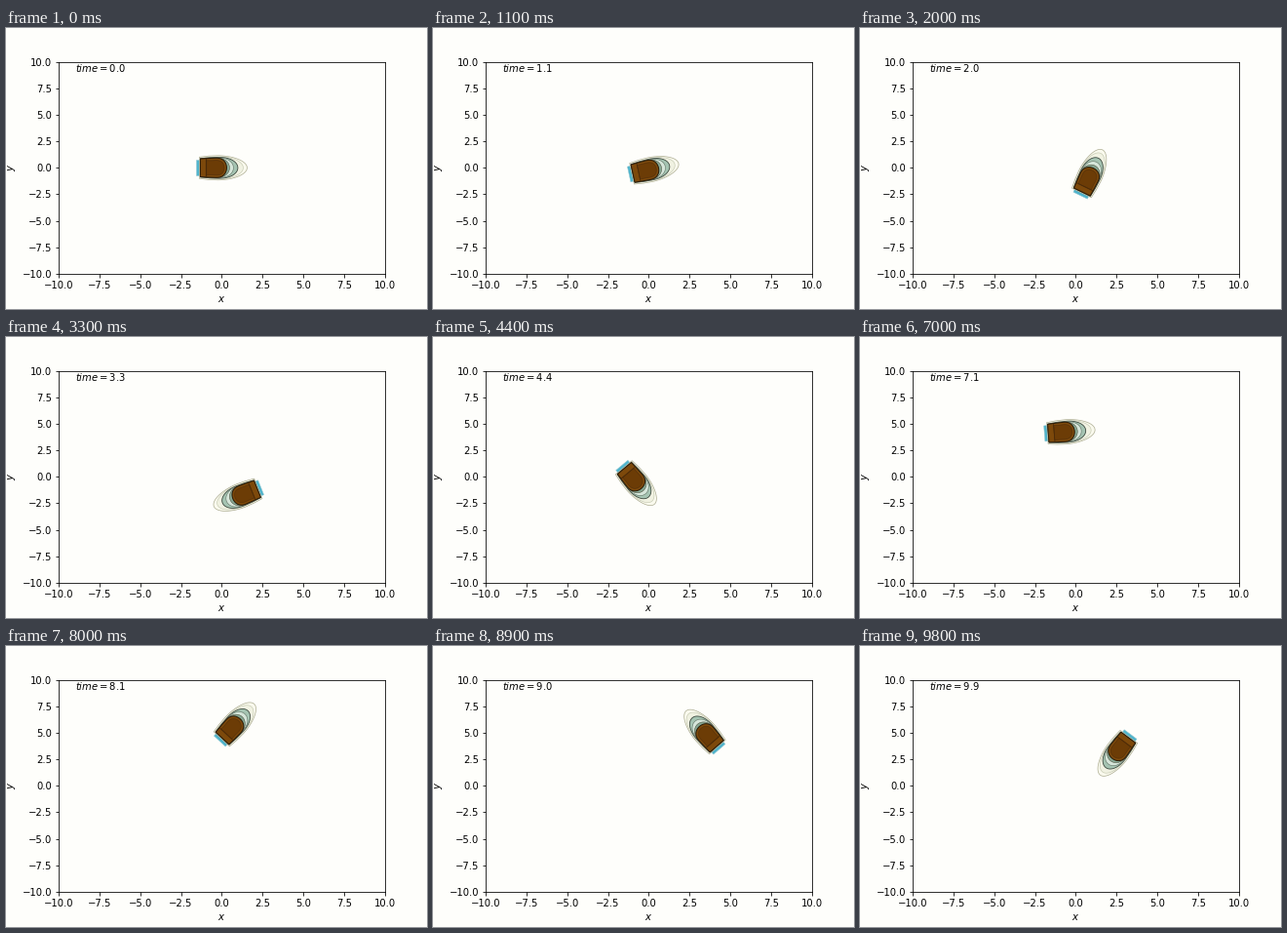
Write a matplotlib script that moves like this. It is 432x288 px and loops after 9.9 s.

```python
import numpy as np
import matplotlib.pyplot as plt
from matplotlib.animation import FuncAnimation
from matplotlib.patches import Polygon
from matplotlib.transforms import Affine2D

FRAMES, INTERVAL = 99, 100
W, H, DPI = 432, 288, 72
PAPER = "#fefefb"

plt.rcParams.update({"font.family": "DejaVu Sans", "font.size": 10,
                     "mathtext.fontset": "dejavusans"})


def heading(t):
    return t - np.sin(t)


def build_track():
    """Integrate the drift velocity, then pull the track onto its waypoints."""
    t = np.linspace(0, 10, 2001)
    surge = np.interp(t, [0, 1.3, 2.67, 3.8, 4.6, 5.4, 6.3, 7, 8.08, 9, 9.9],
                      [0, .72, 1.1, 1.55, 1.1, .45, .05, .2, .85, 1.2, 1.1])
    sway = np.interp(t, [0, 1.3, 2, 2.67, 3.9, 5.2, 6.3, 7, 8.08, 9, 9.9],
                     [0, .05, .4, .9, 1.5, 1.9, 1.95, 1.9, 2.4, 2.95, 3.1])
    vel = (surge + 1j * sway) * np.exp(-1j * heading(t))
    pos = np.concatenate([[0], np.cumsum((vel[1:] + vel[:-1]) / 2) * t[1]])
    marks = np.array([0, 20, 33, 44, 59, 80, 98]) * 10 / 99
    goals = np.array([0, .96 - .46j, .96 - 1.9j, -.65 - .75j,
                      -.56 + 2.19j, .93 + 5.96j, 2.43 + 2.93j])
    return t, pos + np.interp(t, marks, goals - np.interp(marks, t, pos))


def bow_shape(back, mid, front, half, power=2.2, stern=0.88):
    """Outline with a flat stern and a rounded bow, in pixels, bow to +x."""
    s = np.sin(np.linspace(0, np.pi / 2, 30))
    x = np.concatenate([[back, (back + mid) / 2], mid + (front - mid) * s])
    y = half * np.concatenate([[stern, 0.97], np.sqrt(1 - s ** power)])
    return np.column_stack([np.r_[x, x[::-1]], np.r_[y, -y[::-1]]])


def box(x0, x1, half):
    return np.array([(x0, -half), (x1, -half), (x1, half), (x0, half)])


fig = plt.figure(figsize=(W / DPI, H / DPI), dpi=DPI, facecolor=PAPER)
fig.subplots_adjust(left=0.125, right=0.9, bottom=0.125, top=0.88)
ax = fig.add_subplot(facecolor=PAPER)
ax.set(xlim=(-10, 10), ylim=(-10, 10), xlabel="$x$", ylabel="$y$",
       xticks=np.arange(-10, 10.1, 2.5), yticks=np.arange(-10, 10.1, 2.5))
clock = ax.text(-9, 9, "")

# outline, fill, edge, line width
LAYERS = [
    (box(-26, -22, 8), "#4fb4cc", "#8fc6d0", 0.5),
    (bow_shape(-23, -4, 26, 12.5, 1.9), "#fafaee", "#adad92", 0.7),
    (bow_shape(-22, -2, 22, 11.3, 2.0), "#f1f2e2", "#c4c8b0", 0.6),
    (bow_shape(-22, -3, 16.5, 10.8), "#a5c4b2", "#38443a", 0.8),
    (bow_shape(-22, -3, 12, 10.3), "#d6e6da", "#66786a", 0.6),
    (bow_shape(-22, -5, 8, 10.2), "#86a894", "#4a4a38", 0.5),
    (bow_shape(-22, -6, 5, 10, 2.6, 0.93), "#7d490b", "#2b1a06", 1.0),
    (bow_shape(-16, -6, 2.5, 7.6, 2.6, 0.98), "#6c3c06", "#55300a", 0.6),
    (box(-16.3, -15.7, 9.3), "#4a2a08", "#4a2a08", 0.2),
]
boat = [ax.add_patch(Polygon(pts, closed=True, fc=fill, ec=edge, lw=lw, zorder=2))
        for pts, fill, edge, lw in LAYERS]

track_t, track = build_track()
area = ax.get_position()


def update(i):
    t = i * 10 / 99
    p = np.interp(t, track_t, track)
    px = W * (area.x0 + area.width * (p.real + 10) / 20)
    py = H * (area.y0 + area.height * (p.imag + 10) / 20)
    place = Affine2D().rotate(heading(t)).translate(px, py).scale(1 / DPI)
    for part in boat:
        part.set_transform(place + fig.dpi_scale_trans)
    clock.set_text(f"$time = {t:.1f}$")
    return [*boat, clock]


anim = FuncAnimation(fig, update, frames=FRAMES, interval=INTERVAL,
                     repeat=True, repeat_delay=0)
plt.show()
```
